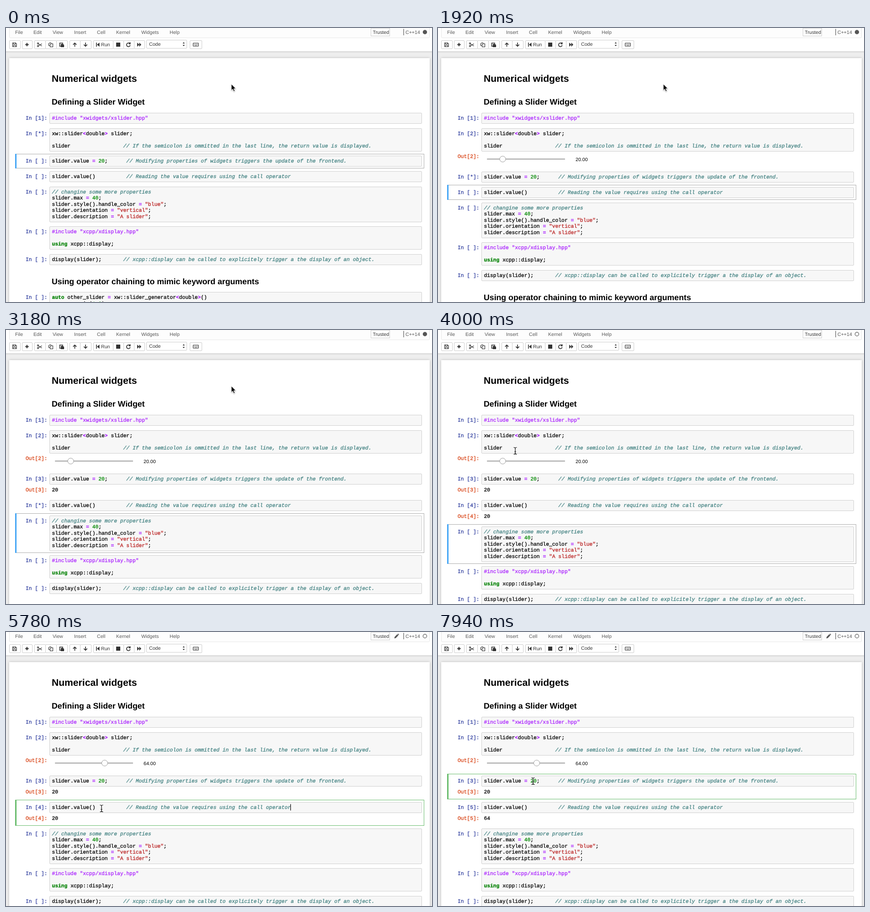
Write an HTML page that moves like this. It is 932 by 601 pixels and loops after 8000 ms.

```html
<!DOCTYPE html>
<html lang="en">
<head>
<meta charset="utf-8">
<title>Numerical widgets</title>
<style>
html, body { margin: 0; width: 932px; height: 601px; overflow: hidden; background: #eee; }
svg { display: block; }
text { text-rendering: geometricPrecision; white-space: pre; }
.ui { font: 10.6px "Liberation Sans", Arial, sans-serif; fill: #333; }
.menu { fill: #585858; }
.h1, .h2 { font: bold 21.1px "Liberation Sans", Arial, sans-serif; fill: #000; }
.h2 { font-size: 17.72px; }
.code { font: 11.32px "Liberation Mono", "Courier New", monospace; fill: #000; stroke: #000; stroke-width: .32px; }
.comment { fill: #408080; stroke: #408080; font-style: italic; }
.meta { fill: #a2f; stroke: #a2f; }
.string { fill: #ba2121; stroke: #ba2121; }
.number { fill: #080; stroke: #080; }
.keyword { fill: #008000; stroke: #008000; font-weight: bold; }
.operator { fill: #a2f; stroke: #a2f; font-weight: bold; }
.in { fill: #303f9f; stroke: #303f9f; }
.out { fill: #d84315; stroke: #d84315; }
.btn { fill: #fff; stroke: #ccc; }
.box { fill: #f7f7f7; stroke: #cfcfcf; }
.icon { fill: #333; }
.line { fill: none; stroke: #333; stroke-width: 1.2; }
</style>
</head>
<body>
<svg id="stage" width="932" height="601" viewBox="0 0 932 601">
  <defs>
    <filter id="soft" x="-5%" y="-5%" width="110%" height="110%">
      <feDropShadow dx="0" dy="0" stdDeviation="2.5" flood-color="#575757" flood-opacity=".35"/>
    </filter>
    <filter id="drop" x="-50%" y="-50%" width="200%" height="200%">
      <feDropShadow dx="0" dy="1" stdDeviation=".8" flood-opacity=".4"/>
    </filter>
  </defs>
  <rect width="932" height="601" fill="#eee"/>
  <rect x="7" y="66" width="920" height="560" fill="#fff" filter="url(#soft)"/>
  <rect x="-10" y="-10" width="952" height="61" fill="#fff" filter="url(#soft)"/>
  <path d="M7.5 0V19.500q0 2 2 2H924.500q2 0 2-2V0" fill="#fdfdfd" stroke="#e7e7e7"/>
  <g id="menu"></g>
  <rect class="btn" x="798.5" y=".5" width="41" height="17"/>
  <text class="ui" x="802.5" y="13">Trusted</text>
  <path id="pencil" fill="#555" d="M849.500 14l.8-3.300 5.600-5.600 2.500 2.500-5.600 5.600ZM856.500 4.600l.8-.7q.6-.4 1.200.1l1 1q.5.600.1 1.100l-.7.800Z"/>
  <path d="M870 2V16" stroke="#555" stroke-width="1.2"/>
  <text class="ui menu" x="874" y="13">C++14</text>
  <circle id="kernel" cx="916.5" cy="9" r="4.100" stroke="#555" stroke-width="1.200"/>
  <g id="buttons"></g>
  <g class="icon">
    <path d="M42.200 35.300h2.600v-2.600h2.200v2.600h2.600v2.200h-2.600v2.600h-2.200v-2.600h-2.600Z"/>
    <path d="M197 32h1.600v9H197ZM199 36.500l5.500-4.500v9Z"/>
    <path d="M241 32h9v9h-9Z"/>
    <path d="M287 32l4.500 4.500-4.500 4.500ZM291.500 32l4.500 4.500-4.500 4.500Z"/>
    <path d="M268.500 32.200l4-.9v4.400h-4.300l1.500-1.500Z"/>
    <path d="M386.500 34l2.300-3 2.300 3ZM386.500 37l2.300 3 2.300-3Z"/>
  </g>
  <g class="line">
    <path d="M14.500 32.500h6.500l2 2v6.500h-8.500ZM16.500 32.500v3h4v-3M16.500 41v-3h4.500v3"/>
    <path d="M70.500 34.500l8 5M70.500 39.500l8-5"/>
    <circle cx="70" cy="33.800" r="1.500"/><circle cx="70" cy="39.700" r="1.500"/>
    <path d="M96.500 38.500h-3v-4l2-2h3v2M96.500 36.500l2-2h4v7h-6Z"/>
    <path d="M120.500 40h-3v-7h6.500v2" stroke-width="1.600"/>
    <path d="M120.500 35.500h4l2 2v4h-6Z" fill="#333"/>
    <path d="M271 34.500a4 4 0 1 0 .7 3.300" stroke-width="1.700"/>
    <path d="M150.500 41v-8M146.800 36.600l3.700-3.700 3.700 3.700M174 32v8M170.300 36.400l3.700 3.700 3.700-3.700" stroke-width="1.700"/>
    <rect x="409.500" y="33" width="11.500" height="7" rx=".8"/>
    <path d="M411.500 35.200h8M411.500 37h8M413 38.600h5" stroke-width=".9" stroke-dasharray="1.100 .7"/>
  </g>
  <text class="ui" x="208" y="40">Run</text>
  <text class="ui" x="313" y="39">Code</text>
  <text class="h1" x="100" y="118.300">Numerical widgets</text>
  <text class="h2" x="100" y="168.300">Defining a Slider Widget</text>
  <g id="select">
    <rect id="frame" x="20.5" width="894" fill="#fff"/>
    <rect id="bar" x="20" width="3"/>
  </g>
  <g id="cells"></g>
  <text id="chain" class="h2" x="100">Using operator chaining to mimic keyword arguments</text>
  <g id="slider">
    <rect x="107" y="-1.500" width="171" height="3" rx="1" fill="#bdbdbd"/>
    <circle id="knob" r="6.500"/>
    <text id="value" class="ui" x="314.300" y="4" text-anchor="middle" style="fill:#000"></text>
  </g>
  <rect id="caret" width="1.200" height="14"/>
  <path id="arrow" d="M0 0V13.700L3.100 10.900 5.300 16 7.700 15 5.500 10H9.700Z" stroke="#fff" stroke-width="1" filter="url(#drop)"/>
  <g id="beam" fill="none">
    <path d="M-3.500-7.500Q0-7.500 0-5.500Q0-7.500 3.500-7.500M0-5.500V5.500M-3.500 7.500Q0 7.500 0 5.500Q0 7.500 3.500 7.500M-1.800 2h3.600" stroke="#fff" stroke-width="2.400" stroke-opacity=".7"/>
    <path d="M-3.500-7.500Q0-7.500 0-5.500Q0-7.500 3.500-7.500M0-5.500V5.500M-3.500 7.500Q0 7.500 0 5.500Q0 7.500 3.500 7.500M-1.800 2h3.600" stroke="#000" stroke-width="1.200"/>
  </g>
</svg>
<script>
const LOOP = 8000, PITCH = 33.7, LINE = 13.5;
const $ = id => document.getElementById(id);
const set = (el, attrs) => { for (const k in attrs) el.setAttribute(k, attrs[k]); return el; };
const add = (parent, tag, attrs, text) => {
  const el = set(document.createElementNS('http://www.w3.org/2000/svg', tag), attrs);
  if (text) el.textContent = text;
  return parent.appendChild(el);
};
const show = (el, on) => { el.style.display = on ? '' : 'none'; };
const solid = s => s.replace(/ /g, '\u00a0');
const write = (el, s) => { s = solid(s); if (el.textContent !== s) el.textContent = s; };
const note = (code, col, text) => code.padEnd(col) + '// ' + text;
// Value of the last [start, value] step reached
const at = (t, steps) => steps.reduce((v, [start, next]) => t >= start ? next : v, undefined);

const sources = [
  ['#include "xwidgets/xslider.hpp"'],
  ['xw::slider<double> slider;', '',
    note('slider', 23, 'If the semicolon is ommitted in the last line, the return value is displayed.')],
  [note('slider.value = 20;', 24, 'Modifying properties of widgets triggers the update of the frontend.')],
  [note('slider.value()', 24, 'Reading the value requires using the call operator')],
  ['// changine some more properties', 'slider.max = 40;', 'slider.style().handle_color = "blue";',
    'slider.orientation = "vertical";', 'slider.description = "A slider";'],
  ['#include "xcpp/xdisplay.hpp"', '', 'using xcpp::display;'],
  [note('display(slider);', 23, 'xcpp::display can be called to explicitely trigger a the display of an object.')],
  ['auto other_slider = xw::slider_generator<double>()', '        .min(1.0)']
];

const kinds = ['comment', 'meta', 'string', 'number', 'keyword', 'operator'];
const token = /(\/\/.*)|(#include.*)|("[^"]*")|(\b\d+(?:\.\d+)?\b)|\b(using|auto)\b|([=<>])/g;

function codeLine(parent, src, y) {
  const line = add(parent, 'text', { class: 'code', x: 100.4, y });
  let end = 0;
  const plain = s => { if (s) add(line, 'tspan', {}, solid(s)); };
  for (const m of src.matchAll(token)) {
    plain(src.slice(end, m.index));
    add(line, 'tspan', { class: kinds[m.slice(1).findIndex(Boolean)] }, solid(m[0]));
    end = m.index + m[0].length;
  }
  plain(src.slice(end));
}

const cells = sources.map(lines => {
  const g = add($('cells'), 'g', {});
  const extra = LINE * (lines.length - 1), height = PITCH + extra;
  const box = add(g, 'rect', { class: 'box', x: 95.5, width: 814, height: Math.round(23 + extra), rx: 1.5 });
  const text = add(g, 'g', {});
  lines.forEach((src, i) => codeLine(text, src, 20 + i * LINE));
  const prompt = add(text, 'text', { class: 'code in', x: 43, y: 20 });
  const outPrompt = add(text, 'text', { class: 'code out', x: 43, y: height + 10 });
  const outText = add(text, 'text', { class: 'code', x: 100.4, y: height + 10 });
  return { box, text, prompt, outPrompt, outText, height };
});

[['File', 20], ['Edit', 60], ['View', 102], ['Insert', 149], ['Cell', 199],
  ['Kernel', 241], ['Widgets', 296], ['Help', 358]]
  .forEach(([name, x]) => add($('menu'), 'text', { class: 'ui menu', x, y: 13 }, name));

[[7, 24], [35, 22], [62, 24], [86, 24], [110, 24], [139, 23], [162, 24], [191, 43],
  [234, 23], [257, 23], [280, 23], [307, 88], [402, 26]]
  .forEach(([x, w]) => add($('buttons'), 'rect',
    { class: 'btn', x: x + .5, y: w === 88 ? 26.5 : 27.5, width: w, height: 18, rx: 1.5 }));

// Pointer moves: first step, last step, step count, path
const moves = [
  [3500, 3620, 2, [[493, 123], [360, 166], [218, 214]]],
  [3830, 4000, 3, [[218, 214], [169, 265]]],
  [4090, 4540, 6, [[169, 265], [146, 283], [136, 289]]],
  [4710, 5120, 7, [[136, 289], [211, 289]]],
  [5190, 5460, 5, [[211, 289], [209, 345], [209, 392], [209, 387]]],
  [6490, 7060, 7, [[209, 387], [209, 345]]],
  [7140, 7350, 3, [[209, 345], [208, 327]]]
];

function pointer(t) {
  const move = moves.filter(m => t >= m[0]).pop();
  if (!move) return moves[0][3][0];
  const [start, end, steps, path] = move;
  const done = Math.min(steps, 1 + Math.floor((t - start) / (end - start) * (steps - 1) + 1e-6));
  const pos = done / steps * (path.length - 1);
  const i = Math.min(Math.floor(pos), path.length - 2);
  return path[i].map((a, k) => a + (path[i + 1][k] - a) * (pos - i));
}

function render(t) {
  const selected = at(t, [[0, 2], [1830, 3], [3180, 4], [5780, 3], [6320, 4], [7430, 2]]);
  const editing = t >= 5780 && t < 6320 || t >= 7430;
  const busy = at(t, [[0, 1], [1050, 0], [1830, 1], [2130, 0], [3180, 1], [3320, 0], [6320, 1], [6400, 0]]);
  const counts = ['1',
    at(t, [[0, '*'], [1050, '2']]),
    at(t, [[0, ' '], [1830, '*'], [2130, '3']]),
    at(t, [[0, ' '], [3180, '*'], [3320, '4'], [6320, '*'], [6400, '5']])];
  const outs = ['', '', at(t, [[0, ''], [2130, '20']]),
    at(t, [[0, ''], [3320, '20'], [6320, ''], [6400, '64']])];
  const hasSlider = t >= 1050;
  const [px, py] = pointer(t);

  let top = 180.9;
  const inputs = [];
  cells.forEach((c, i) => {
    if (i === 7) {
      set($('chain'), { y: top + 36.7 });
      top += 49.2;
    }
    const count = counts[i] || ' ', out = outs[i] || '', widget = i === 1 && hasSlider;
    const boxTop = Math.round(top + 4.9);
    set(c.box, { y: boxTop + .5 });
    set(c.text, { transform: `translate(0 ${top})` });
    write(c.prompt, `In [${count}]:`);
    write(c.outPrompt, out || widget ? `Out[${count}]:` : '');
    write(c.outText, out);
    inputs.push([boxTop, boxTop + c.height - 10]);

    const full = c.height + (widget ? 35 : out ? 24 : 0);
    if (i === 1) set($('slider'), { transform: `translate(0 ${top + 72.9})` });
    if (i === selected) {
      const y = Math.round(top + .4), h = Math.round(top + full - .6) - y;
      set($('frame'), { y: y + .5, height: h - 1, stroke: editing ? '#66bb6a' : '#ababab' });
      set($('bar'), { y, height: h, fill: editing ? '#66bb6a' : '#42a5f5' });
      if (editing) set($('caret'), { x: i === 3 ? 622 : 209, y: boxTop + 4.5 });
    }
    top += full;
  });

  show($('slider'), hasSlider);
  const dragged = t < 4710 ? 0 : t < 5190 ? (px - 136) / 75 : 1;
  const value = t < 1920 ? 0 : Math.round(20 + 44 * dragged);
  const active = t >= 4540 && t < 5780, pressed = t >= 4710 && t < 5190;
  set($('knob'), {
    cx: 107.7 + 1.69 * value, r: pressed ? 7.8 : 6.5,
    fill: active ? '#2196f3' : '#fff', stroke: active ? '#2196f3' : '#9e9e9e'
  });
  write($('value'), value.toFixed(2));

  show($('pencil'), editing);
  show($('caret'), editing && t < 7940);
  set($('kernel'), { fill: busy ? '#555' : '#fff' });

  const overCode = px < 400 && inputs.some(([a, b]) => py > a && py < b);
  show($('arrow'), !overCode);
  show($('beam'), overCode);
  set($(overCode ? 'beam' : 'arrow'), { transform: `translate(${px} ${py})` });
}

const begin = performance.now();
function tick() {
  render((performance.now() - begin) % LOOP);
  requestAnimationFrame(tick);
}
tick();
</script>
</body>
</html>
```
